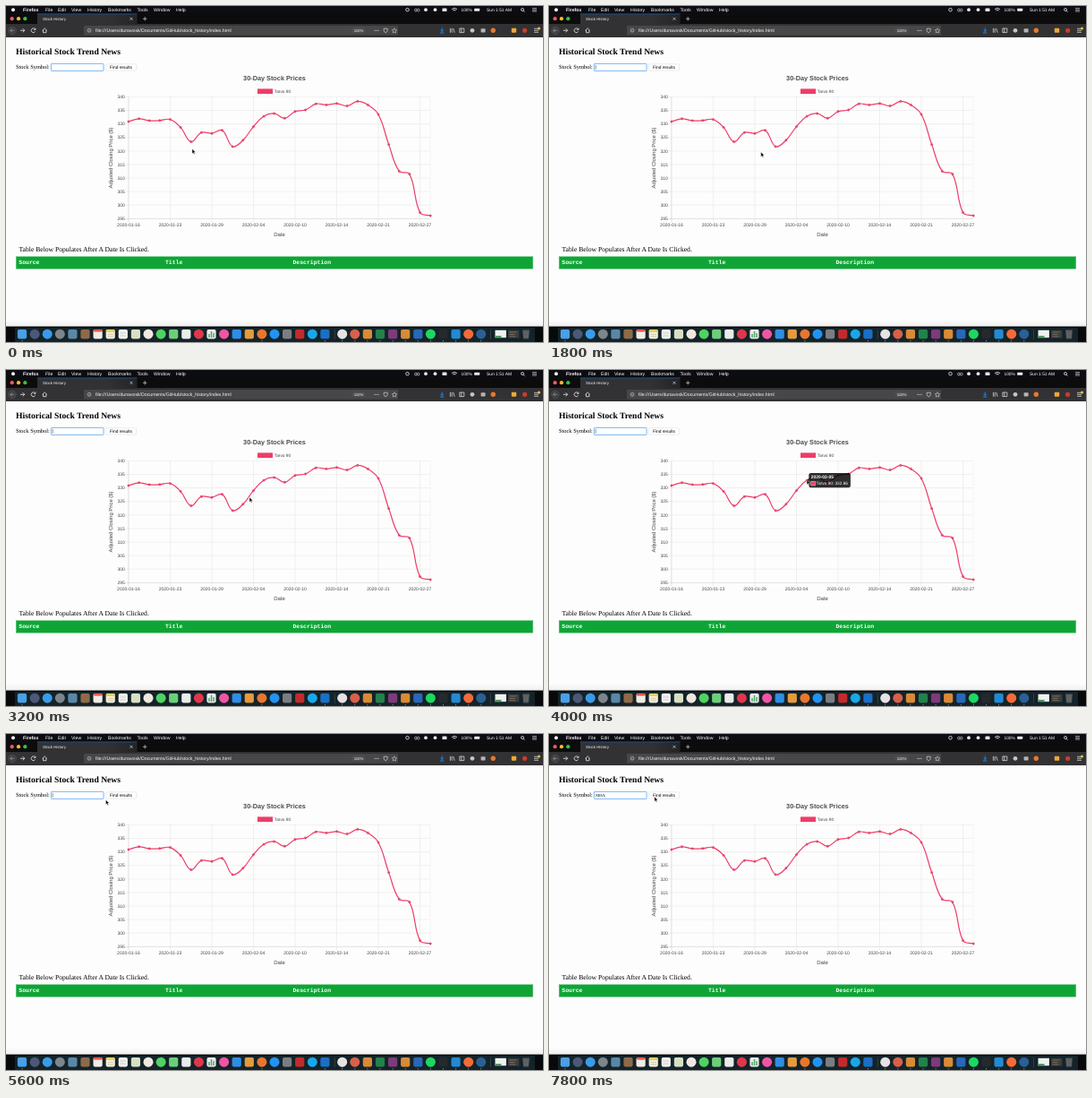
Animation of 600x375 px, one loop 8 s. Source, as an HTML page:

```html
<!DOCTYPE html>
<html lang="en">
<head>
<meta charset="utf-8">
<title>Stock History</title>
<style>
  html, body { margin: 0; width: 100%; height: 100%; overflow: hidden; background: #fdfdfd; }
  svg { display: block; width: 100vw; height: 100vh; }
  text { font-family: "Liberation Sans", Arial, sans-serif; white-space: pre; text-rendering: geometricPrecision; }
  .serif { font-family: "Liberation Serif", Times, serif; }
  .mono { font-family: "Liberation Mono", Courier, monospace; }
  .bold { font-weight: bold; }
</style>
</head>
<body>
<svg id="stage" viewBox="0 0 600 375" xmlns="http://www.w3.org/2000/svg">
  <defs>
    <linearGradient id="tabFill"><stop offset=".7" stop-color="#323234"/><stop offset="1" stop-color="#242426"/></linearGradient>
    <linearGradient id="shade" x2="0" y2="1"><stop stop-color="#fdfdfd"/><stop offset="1" stop-color="#ededed"/></linearGradient>
  </defs>
  <rect width="600" height="375" fill="#fdfdfd"/>
  <g id="browser"></g>
  <g id="page"></g>
  <g id="chart"></g>
  <g id="dock"></g>
  <g id="tips"></g>
  <path id="caret" d="M52.2 66v4.8" stroke="#222" stroke-width=".5"/>
  <g id="arrow">
    <path d="M0 0V5.3L1.25 4.2L2.1 6.1L3 5.7L2.15 3.85H3.8Z" fill="#000" stroke="#fff" stroke-width=".4"/>
  </g>
  <g id="beam" fill="none" stroke="#111" stroke-width=".6">
    <path d="M-1.2 -2.9Q0 -2.9 0 -2V2Q0 2.9 -1.2 2.9M1.2 -2.9Q0 -2.9 0 -2M0 2Q0 2.9 1.2 2.9"/>
  </g>
</svg>
<script>
const LOOP = 8000, STEP = 200;
const PINK = '#ee3d69';
const $ = id => document.getElementById(id);

function add(parent, tag, attrs, content) {
  const el = document.createElementNS('http://www.w3.org/2000/svg', tag);
  for (const key in attrs) el.setAttribute(key, attrs[key]);
  if (content !== undefined) el.textContent = content;
  parent.append(el);
  return el;
}
const rect = (g, x, y, width, height, fill, more) => add(g, 'rect', { x, y, width, height, fill, ...more });
const dot = (g, cx, cy, r, fill, more) => add(g, 'circle', { cx, cy, r, fill, ...more });
const line = (g, d, stroke, width = .8, more) =>
  add(g, 'path', { d, stroke, 'stroke-width': width, fill: 'none', ...more });
const label = (g, x, y, size, fill, words, more) =>
  add(g, 'text', { x, y, 'font-size': size, fill, ...more }, words);

function drawBrowser(g) {
  const ink = '#d6d6d8';
  rect(g, 0, 0, 600, 9, '#0c0d12');
  rect(g, 0, 8, 600, 13, '#0c0c0d');
  rect(g, 0, 20, 600, 15, '#323234');

  dot(g, 8, 4.2, 2, '#f2f2f2');
  label(g, 19, 6.1, 5.2, '#fff', 'Firefox', { class: 'bold' });
  const menu = { File: 44, Edit: 58, View: 73, History: 91, Bookmarks: 114, Tools: 146.5, Window: 165, Help: 190 };
  for (const name in menu) label(g, menu[name], 6.1, 5.2, '#fff', name);
  dot(g, 448.5, 4.2, 1.8, 'none', { stroke: '#eee', 'stroke-width': .8 });
  for (const x of [469, 479.5]) dot(g, x, 4.2, 1.9, '#e6e6e6');
  line(g, 'M456.5 4.6a1.4 1.4 0 1 0 2.8 0a1.4 1.4 0 1 0 -2.8 0M459.3 4.6a1.4 1.4 0 1 0 2.8 0a1.4 1.4 0 1 0 -2.8 0', ink, .7);
  rect(g, 487.5, 2.4, 5, 3.6, '#e6e6e6', { rx: .5 });
  line(g, 'M498 3.6q3 -2.6 6 0M499.4 5q1.6 -1.4 3.2 0', '#fff');
  label(g, 508.5, 6, 4.8, '#fff', '100%');
  rect(g, 523.2, 2.7, 6, 3.1, '#eee', { rx: .6 });
  label(g, 537, 6.1, 4.9, '#fff', 'Sun 1:51 AM');
  line(g, 'M575.5 4a1.5 1.5 0 1 0 3 0a1.5 1.5 0 1 0 -3 0M578 5.2l1.6 1.5', '#fff', .7);
  line(g, 'M588 2.6h5M588 4.3h5M588 6h5', '#fff', .6);

  ['#fc5b57', '#fdbc2e', '#2bc840'].forEach((fill, i) => dot(g, 6.7 + i * 7.3, 14.2, 2.1, fill));
  rect(g, 35, 9, 111.5, 11.5, 'url(#tabFill)');
  rect(g, 35, 8.6, 111.5, .6, '#0a72de');
  label(g, 41, 16.2, 4.4, '#f5f5f7', 'Stock History');
  line(g, 'M138.5 12.8l3 3m0 -3l-3 3M153 14.3h4.4m-2.2 -2.2v4.4', ink, .7);

  dot(g, 7, 27.3, 4.3, '#3e3e41', { stroke: '#5e5e62', 'stroke-width': .5 });
  line(g, 'M9.3 27.3H4.8m2 -2L4.8 27.3l2 2', '#98989c', .8);
  line(g, 'M16 27.3h4.8m-2.1 -2.1l2.1 2.1l-2.1 2.1', ink, .9);
  line(g, 'M32.6 26a2.4 2.4 0 1 0 .1 2.4M33 24.6v1.8h-1.8', ink, .9);
  line(g, 'M40.6 27.4l2.6 -2.5l2.6 2.5M41.5 27v2.7h3.4V27', ink, .9);
  rect(g, 87, 22, 351, 10.6, '#474749', { rx: 1.2 });
  dot(g, 93, 27.3, 1.9, 'none', { stroke: ink, 'stroke-width': .6 });
  line(g, 'M93 26.9v1.4', ink, .6);
  label(g, 100, 29.1, 5.2, '#f9f9fa', 'file:///Users/dunavosk/Documents/GitHub/stock_history/index.html');
  rect(g, 386.5, 24, 15, 6.5, '#4e4e51', { rx: 3.2 });
  label(g, 394, 28.9, 4.3, '#f5f5f5', '110%', { 'text-anchor': 'middle' });
  for (const x of [412, 414, 416]) dot(g, x, 27.3, .6, ink);
  line(g, 'M422.2 25.2h4v2.4q-.5 1.6 -2 2.2q-1.5 -.6 -2 -2.2Z', ink, .7);
  line(g, 'M434 24.8l.8 1.8l1.9 .2l-1.4 1.3l.4 1.9l-1.7 -1l-1.7 1l.4 -1.9l-1.4 -1.3l1.9 -.2Z', ink, .6);

  line(g, 'M487.2 24.4v4m-1.7 -1.6l1.7 1.7l1.7 -1.7M485 30h4.4', '#1e8fff', .9);
  line(g, 'M496.4 24.8v5M498.2 24.8v5M499.8 25l1.4 4.8', ink, .8);
  line(g, 'M506.8 25h5v4.6h-5ZM508.8 25v4.6', ink, .8);
  dot(g, 521, 27.3, 2.4, '#c6c6c9');
  rect(g, 530.6, 25.2, 5, 4.2, '#b4b4b7', { rx: .6 });
  dot(g, 544.3, 27.3, 2.7, '#e8782c');
  rect(g, 564.8, 24.8, 5.4, 5, '#eda936', { rx: .8 });
  dot(g, 579.6, 27.3, 2.6, '#cf3a2c');
  line(g, 'M590 25.3h5M590 27.3h5M590 29.3h5', '#f0f0f0', .7);
  dot(g, 595.5, 25, 1.5, '#f4c430');
}

let entry;
function drawPage(g) {
  label(g, 11, 53.5, 9.6, '#000', 'Historical Stock Trend News', { class: 'serif bold' });
  label(g, 11, 70, 6.4, '#000', 'Stock Symbol:', { class: 'serif' });
  rect(g, 50.4, 64.4, 58.6, 8, '#fff', { stroke: '#7db7f0', 'stroke-width': 1, rx: .5 });
  entry = label(g, 52, 69.9, 4.4, '#000', '');
  rect(g, 111.3, 64.8, 34.3, 7.2, '#fff', { stroke: '#d8d8d8', 'stroke-width': .5, rx: 1.4 });
  label(g, 128.5, 70, 4.85, '#000', 'Find results', { 'text-anchor': 'middle' });
  label(g, 14.5, 274.4, 7.62, '#000', 'Table Below Populates After A Date Is Clicked.', { class: 'serif' });
  rect(g, 11.2, 279.7, 577.6, 13.6, '#0fa536', { stroke: '#6cc784', 'stroke-width': .5 });
  const columns = { Source: 14.3, Title: 178, Description: 320.5 };
  for (const name in columns) label(g, columns[name], 288.3, 6.45, '#fff', name, { class: 'mono bold' });
}

const LEFT = 136.9, TOP = 101.4, RIGHT = 474.2, BOTTOM = 237.4;
const heights = [129, 125.8, 127.9, 127.8, 126.6, 135.4, 151.5, 141.2, 142.2, 138.8, 156.9, 149.8, 134.6, 123.1,
  120, 125.3, 117.7, 116, 109.2, 110.4, 108.8, 111.5, 106.4, 110.4, 121, 154.6, 184.4, 187.7, 230.5, 234];
const points = heights.map((y, i) => ({ x: LEFT + i * (RIGHT - LEFT) / 29, y }));

// Control points on either side of a data point, scaled by neighbour distance.
function handles(i, tension = .4) {
  const p = points[i], a = points[i - 1] || p, b = points[i + 1] || p;
  const before = Math.hypot(p.x - a.x, p.y - a.y), after = Math.hypot(b.x - p.x, b.y - p.y);
  const at = k => [p.x + k * (b.x - a.x), p.y + k * (b.y - a.y)];
  const share = tension / (before + after);
  return { back: at(-share * before), ahead: at(share * after) };
}

function drawChart(g) {
  const grey = '#444', middle = { 'text-anchor': 'middle' };
  label(g, 300, 82.6, 7.3, '#4c4c4c', '30-Day Stock Prices', { class: 'bold', ...middle });
  rect(g, 281, 92.4, 17, 5.6, PINK);
  label(g, 299.8, 97, 4.8, grey, 'Tarvo 90');
  for (let i = 0; i < 10; i++) {
    const y = TOP + i * (BOTTOM - TOP) / 9;
    line(g, `M${LEFT - 3.8} ${y}H${RIGHT}`, i < 9 ? '#e3e3e3' : '#c4c4c4', .5);
    label(g, 132.8, y + 1.7, 4.95, grey, 340 - 5 * i, { 'text-anchor': 'end' });
  }
  const dates = ['01-16', '01-23', '01-29', '02-04', '02-10', '02-14', '02-21', '02-27'];
  dates.forEach((date, i) => {
    const { x } = points[i * 4];
    line(g, `M${x} ${TOP}V${BOTTOM + 3.8}`, i ? '#e3e3e3' : '#c4c4c4', .5);
    label(g, x, 246, 5, grey, '2020-' + date, middle);
  });
  line(g, `M${RIGHT} ${TOP}V${BOTTOM}`, '#ececec', .5);
  label(g, 305.5, 256.6, 6, grey, 'Date', middle);
  label(g, 0, 0, 5.9, grey, 'Adjusted Closing Price ($)', { transform: 'translate(118.8 169.5) rotate(-90)', ...middle });

  let d = `M${points[0].x} ${points[0].y}`;
  for (let i = 1; i < points.length; i++)
    d += `C${handles(i - 1).ahead} ${handles(i).back} ${points[i].x} ${points[i].y}`;
  line(g, d, PINK, 1.2);
  for (const p of points) dot(g, p.x, p.y, 1.2, '#e0486f', { stroke: PINK, 'stroke-width': .4 });
}

function makeTip(index, date, value, width) {
  const g = add($('tips'), 'g', { opacity: 0 });
  const { x, y } = points[index], left = x + 2.2;
  add(g, 'path', { d: `M${x + .2} ${y}l2 -2v4Z`, fill: '#000', 'fill-opacity': .82 });
  rect(g, left, y - 8.2, width, 16.4, '#000', { rx: 2.2, 'fill-opacity': .82 });
  label(g, left + 2.4, y - 1.9, 4.95, '#fff', date, { class: 'bold' });
  rect(g, left + 2.5, y + 1.1, 4.8, 4.8, PINK, { stroke: '#fff', 'stroke-width': .4 });
  label(g, left + 8.3, y + 5.2, 4.75, '#fff', 'Tarvo 90: ' + value);
  return g;
}

function drawDock(g) {
  rect(g, 0, 350, 600, 8, 'url(#shade)');
  rect(g, 0, 357.6, 600, 17.4, '#08090a');
  rect(g, 10, 359, 581, 16, '#132329');
  // A leading "o" marks a round icon.
  const apps = ('#4a9fe6 o#4c5878 o#3a9be8 o#7c858c #5a87a8 #8f6a48 #f0ece6 #f5efd6 #f2f2f0 #d9dfc4 o#f0e8e0 ' +
    'o#4fd360 #6ccf78 #e8ecea o#e0364c #ececec o#f055a5 #2f8de4 #e59a3e o#e8762e o#2492f0 #7b7d82 ' +
    '#c22b2b o#1aa7ea #1b6fc4 o#e6e2e4 o#d8604a #d98a35 #23814c #80397b #d98a35 #2a67b8 o#1ed760 ' +
    '#26292c #2489d2 o#f56b38 o#2b5f96').split(' ');
  apps.forEach((app, i) => {
    const x = 18 + i * 14.1 + (i > 24 ? 5.2 : 0), fill = app.replace('o', '');
    if (app[0] === 'o') dot(g, x, 366.2, 5.5, fill);
    else rect(g, x - 5.1, 361, 10.2, 10.4, fill, { rx: 1.8 });
    if (i === 0 || i === 19 || i > 23) dot(g, x, 373.8, .5, '#ddd');
  });
  // Calendar and note details
  rect(g, 98, 361.2, 9.6, 2.4, '#e7473c', { rx: 1 });
  rect(g, 111.8, 361.2, 9.8, 2.8, '#f4ce4c', { rx: 1 });
  line(g, 'M113.5 366.5h6.4M113.5 368.8h6.4M127.5 365h6.4M127.5 368h6.4', '#b5b5b5', .6);
  line(g, 'M227 370v-4M229.5 370v-7M232 370v-5', '#4aa564', 1.4);
  line(g, 'M367.3 361v11M541.5 361v11', '#5b5b5e', .5);
  rect(g, 546.5, 361.8, 12.4, 8.4, '#f0f1f0');
  rect(g, 546.5, 368, 7, 2.2, '#4f9a63');
  rect(g, 561, 361.8, 12.4, 8.8, '#3a3d3f');
  line(g, 'M562.5 364h8M562.5 366.5h6M562.5 368.8h7', '#a58a66', .6);
  add(g, 'path', { d: 'M577 361.5h8l-1 10h-6Z', fill: '#54585b' });
  line(g, 'M579 363l.5 7M581 363v7M583 363l-.5 7', '#85898c', .4);
}

// [time, x, y]
const route = [
  [0, 208, 159.5], [200, 208, 158], [600, 207.4, 151.5], [1200, 207.6, 151.5], [1600, 226, 160],
  [2000, 247.5, 166], [2200, 248.8, 166.2], [2600, 253, 163], [3200, 272, 142], [3600, 288, 122.5],
  [4600, 288.2, 122.6], [4800, 222, 109], [5000, 149.6, 99.6], [5400, 118, 78], [5800, 105, 69],
  [7400, 105, 69], [7600, 113, 69.5], [7800, 117.8, 70], [8000, 117.8, 70]
];
const fades = [
  [[0, 0], [200, 0], [600, 1], [1200, 1], [1600, 0]],
  [[0, 0], [3400, 0], [3800, 1], [4600, 1], [4800, .25], [5000, .05], [5200, 0]]
];
const SYMBOL = 'XEVL', TYPING = 6800;

function sample(track, t, column = 1) {
  const i = track.findIndex(row => row[0] > t);
  if (i < 0) return track[track.length - 1][column];
  const a = track[i - 1], b = track[i];
  return a[column] + (b[column] - a[column]) * (t - a[0]) / (b[0] - a[0]);
}

drawBrowser($('browser'));
drawPage($('page'));
drawChart($('chart'));
drawDock($('dock'));
const tips = [makeTip(6, '2020-01-27', '323.5', 44), makeTip(13, '2020-02-05', '332.86', 46.6)];

function render() {
  const t = Math.floor(performance.now() % LOOP / STEP) * STEP;
  const x = sample(route, t), y = sample(route, t, 2);
  const overInput = x > 50 && x < 109 && y > 64 && y < 73;
  for (const id of ['arrow', 'beam']) {
    $(id).setAttribute('transform', `translate(${x} ${y})`);
    $(id).style.display = (id === 'beam') === overInput ? '' : 'none';
  }
  tips.forEach((tip, i) => tip.setAttribute('opacity', sample(fades[i], t)));
  const typed = Math.max(0, Math.floor((t - TYPING) / STEP) + 1);
  entry.textContent = SYMBOL.slice(0, typed);
  $('caret').style.display = !typed && t % 1134 >= 567 ? '' : 'none';
  requestAnimationFrame(render);
}
render();
</script>
</body>
</html>
```
